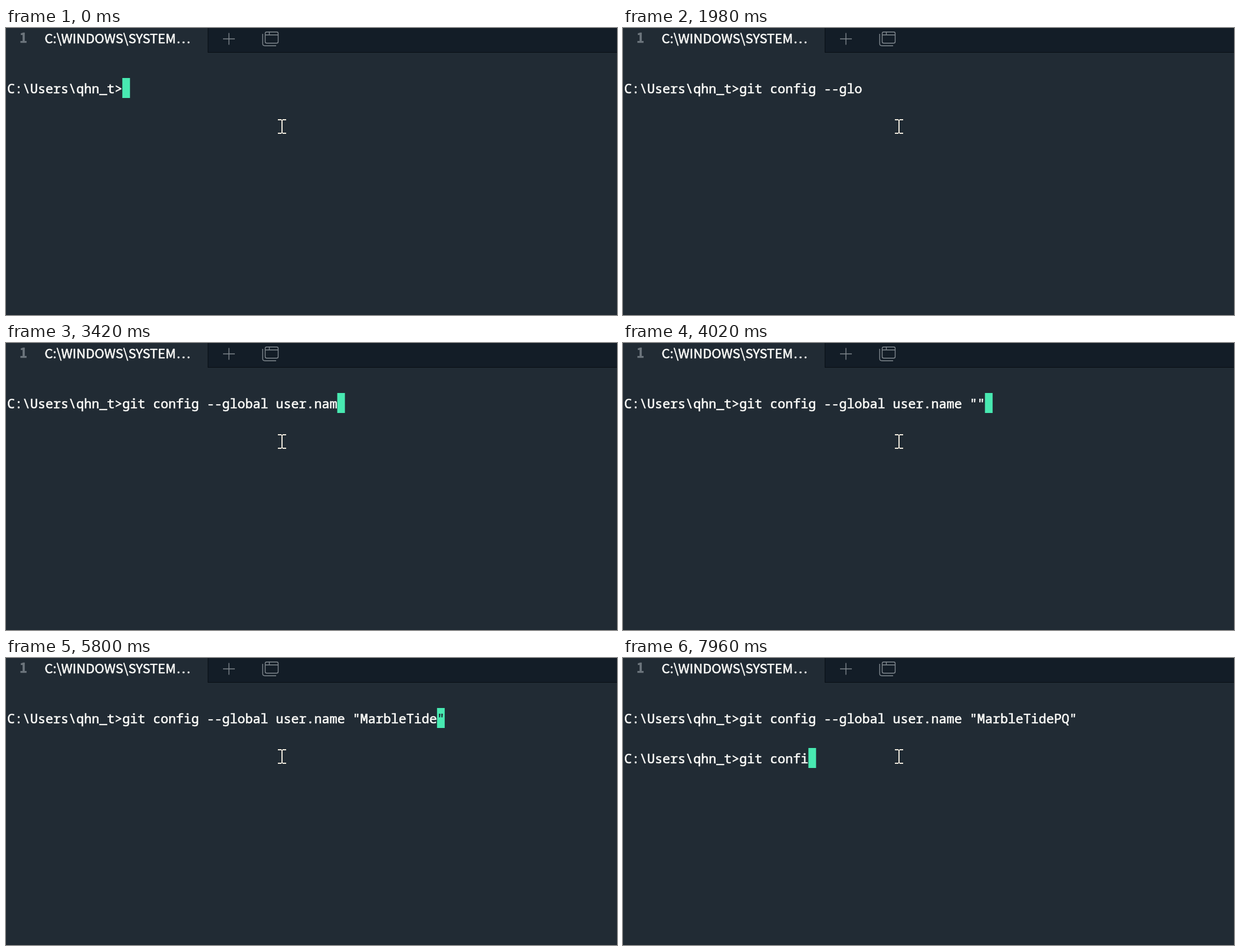
Recreate the animation shown at these times as an HTML page with a canvas. Size 1036 px wide and 488 px high, loop 8000 ms.

```html
<!DOCTYPE html>
<html lang="en">
<head>
<meta charset="utf-8">
<title>Terminal</title>
<style>
  html, body { margin: 0; width: 100%; height: 100%; overflow: hidden; background: #212b34; }
  canvas { display: block; }
</style>
</head>
<body>
<canvas id="stage" width="1036" height="488"></canvas>
<script>
const ctx = document.getElementById('stage').getContext('2d');
const LOOP = 8000, CELL = 13.015, LEFT = 2, ROW = 34, TOP = 85;
const BG = '#212b34', BAR = '#131d27', EDGE = '#090f15', TEXT = '#fbfbf8', CURSOR = '#48e9b1', ICON = '#7f878d';
const MONO = '21.69px "Noto Sans Mono", monospace';
const SANS = '"Noto Sans CJK SC", "Noto Sans CJK JP", "Noto Sans", sans-serif';
const PROMPT = 'C:\\Users\\qhn_t>';

// [start ms, ms per key, keys]; ○ and ● blink the cursor, ← and → move it, ⏎ runs the line
const typing = [
  [120, 0, '○'], [240, 60, 'git '], [660, 100, 'conf'], [1020, 60, 'ig '],
  [1320, 60, '--'], [1620, 60, '○glo'], [1980, 60, '○b'], [2160, 60, 'al '],
  [2520, 0, '○'], [2820, 60, 'user'], [3180, 80, '.nam'], [3540, 120, 'e '],
  [3960, 60, '""'], [4260, 0, '←'], [4480, 100, 'Marb'], [4840, 60, 'le'],
  [5140, 80, 'Tide'], [5680, 80, '○●PQ'], [6100, 0, '→'], [6280, 0, '⏎'],
  [6580, 0, '○'], [6820, 0, '●'], [7120, 60, '○git '], [7600, 90, 'confi']
];
const keys = typing.flatMap(([start, step, text]) =>
  [...text].map((key, i) => ({ at: start + i * step, key })));

function terminalAt(time) {
  const lines = [PROMPT];
  let col = PROMPT.length, visible = true;
  for (const { at, key } of keys) {
    if (at > time) break;
    const row = lines.length - 1;
    visible = key !== '○';
    if (key === '←') col--;
    else if (key === '→') col++;
    else if (key === '⏎') {
      lines.push('', PROMPT);
      col = PROMPT.length;
    } else if (key !== '○' && key !== '●') {
      lines[row] = lines[row].slice(0, col) + key + lines[row].slice(col);
      col++;
    }
  }
  return { lines, col, visible };
}

function box(color, x, y, w, h) {
  ctx.fillStyle = color;
  ctx.fillRect(x, y, w, h);
}

// The thin outline gives the text a medium weight
function label(text, x, y, font, color) {
  ctx.font = font;
  ctx.fillStyle = ctx.strokeStyle = color;
  ctx.lineWidth = 0.6;
  ctx.lineJoin = 'round';
  ctx.fillText(text, x, y);
  ctx.strokeText(text, x, y);
}

function drawTabs() {
  box(BAR, 342, 0, 694, 41);
  box(EDGE, 342, 0, 1, 42);
  box(EDGE, 342, 41, 694, 1);
  label('1', 23, 25, `bold 22px ${SANS}`, '#6d767d');
  label('C:\\WINDOWS\\SYSTEM', 65.5, 26, `22px ${SANS}`, TEXT);
  for (const x of [289.5, 298, 306.5]) label('.', x, 26, `22px ${SANS}`, TEXT);

  ctx.strokeStyle = ICON;
  ctx.lineWidth = 1.4;
  ctx.stroke(new Path2D('M368 18.5H388M378 8.5V28.5'));
  ctx.stroke(new Path2D('M442 6.7H459Q461.5 6.7 461.5 9.2V23.3Q461.5 25.8 459 25.8H442Q439.5 25.8 439.5 23.3V9.2Q439.5 6.7 442 6.7Z' +
    'M439.5 11.8H461.5M446.5 7V11.8M435.2 10V26.5Q435.2 30.2 439 30.2H458'));
}

function drawTerminal({ lines, col, visible }) {
  const cursorRow = lines.length - 1;
  if (visible) box(CURSOR, LEFT + col * CELL, TOP + cursorRow * ROW, CELL, ROW);
  lines.forEach((line, row) => [...line].forEach((char, i) => {
    const covered = visible && row === cursorRow && i === col;
    label(char, LEFT + i * CELL, TOP + 26 + row * ROW, MONO, covered ? BG : TEXT);
  }));
}

function drawPointer() {
  const color = '#eee8dc';
  for (const y of [155, 178]) {
    box(color, 461, y, 6, 2);
    box(color, 469, y, 6, 2);
  }
  box(color, 467, 156, 2, 23);
}

function frame(now) {
  box(BG, 0, 0, 1036, 488);
  box('#1e2730', 0, 487, 1036, 1);
  drawTabs();
  drawTerminal(terminalAt(now % LOOP));
  drawPointer();
  requestAnimationFrame(frame);
}
requestAnimationFrame(frame);
</script>
</body>
</html>
```
